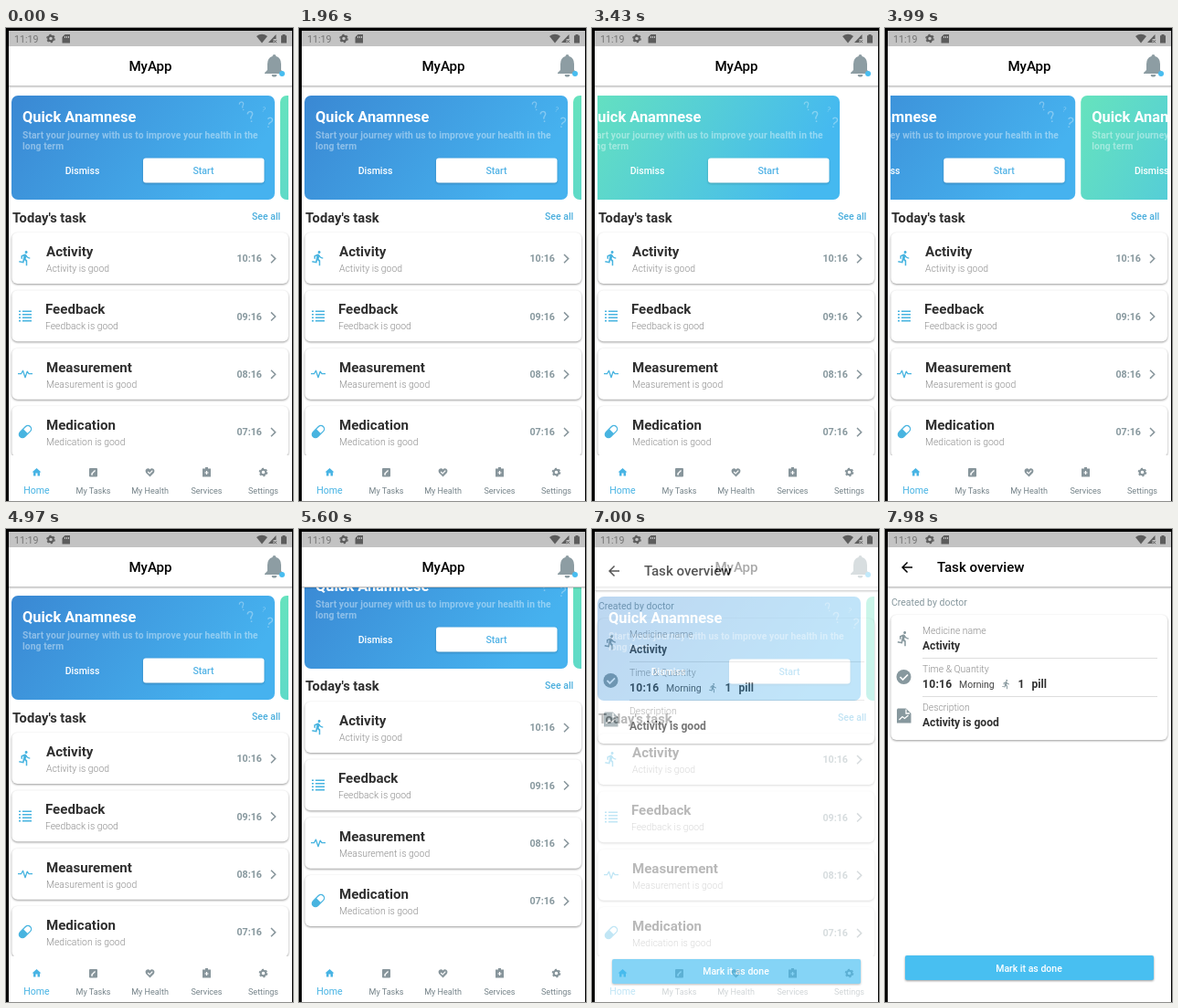
Write an HTML page that moves like this. It is 314 px wide and 518 px high and loops after 8000 ms.

```html
<!DOCTYPE html>
<html lang="en">
<head>
<meta charset="utf-8">
<title>Task app</title>
<style>
html, body { margin: 0; width: 100%; height: 100%; overflow: hidden; background: #fff; }
svg { display: block; width: 314px; height: 518px; font-family: Roboto, sans-serif; }
.b { font-weight: 700; }
.m { font-weight: 500; }
.l { font-weight: 300; }
.mid { text-anchor: middle; }
.h { font-size: 15.08px; }
.s { font-size: 10.5px; }
.v { font-size: 12.06px; font-weight: 700; fill: #303030; }
.hint { font-size: 10.4px; font-weight: 300; fill: #8c8c8c; }
.card { fill: #fff; filter: drop-shadow(0 1px 1px #0006); }

/* The clock in the script sets --t; all keyframes are read at that moment. */
.cards, .list, .page {
  animation: 8s linear infinite paused;
  animation-delay: calc(var(--t, 0) * -1ms);
}
.cards { animation-name: swipe; }
.list { animation-name: scroll; }
.page { animation-name: rise, fade; }
@keyframes swipe {
  0%, 27.125% { transform: none; animation-timing-function: cubic-bezier(.45, 0, .4, 1); }
  36.5% { transform: translateX(-286px); animation-timing-function: ease-out; }
  42.875% { transform: translateX(-317px); animation-timing-function: cubic-bezier(.45, 0, .25, 1); }
  56.875%, 100% { transform: none; }
}
@keyframes scroll {
  0%, 58.625% { transform: none; }
  62.125% { transform: translateY(-1px); animation-timing-function: ease-in-out; }
  69% { transform: translateY(-36px); animation-timing-function: cubic-bezier(.4, 0, .2, 1); }
  78.75% { transform: translateY(-.2px); }
  82.25%, 100% { transform: none; }
}
@keyframes rise {
  0%, 84.575% { transform: translateY(129px); animation-timing-function: cubic-bezier(.4, 0, .2, 1); }
  88.325%, 100% { transform: none; }
}
@keyframes fade {
  0%, 84.575% { opacity: 0; animation-timing-function: ease-in; }
  88.325%, 100% { opacity: 1; }
}
</style>
</head>
<body>
<svg viewBox="0 0 314 518">
  <defs>
    <linearGradient id="blue" x2="1" y2=".3">
      <stop stop-color="#3a88d3"/><stop offset="1" stop-color="#46b2ef"/>
    </linearGradient>
    <linearGradient id="mint" x2="1" y2=".2">
      <stop stop-color="#66e3bd"/><stop offset="1" stop-color="#45b9f0"/>
    </linearGradient>
    <linearGradient id="shade" x2="0" y2="1">
      <stop stop-color="#000" stop-opacity=".27"/><stop offset="1" stop-color="#000" stop-opacity="0"/>
    </linearGradient>
    <clipPath id="strip"><rect x="6" y="66" width="303" height="130"/></clipPath>
    <clipPath id="view"><rect x="3" y="64" width="310" height="404"/></clipPath>

    <!-- icons, centred on 0,0 -->
    <path id="run" transform="translate(-12 -12)" d="M13.49 5.48c1.1 0 2-.9 2-2s-.9-2-2-2-2 .9-2 2 .9 2 2 2zm-3.6 13.9l1-4.4 2.1 2v6h2v-7.5l-2.1-2 .6-3c1.3 1.5 3.3 2.5 5.5 2.5v-2c-1.9 0-3.5-1-4.3-2.4l-1-1.6c-.4-.6-1-1-1.7-1-.3 0-.5.1-.8.1l-5.2 2.2v4.7h2v-3.4l1.8-.7-1.6 8.1-4.9-1-.4 2 7 1.4z"/>
    <g id="gear" fill="none">
      <circle r="2.8" stroke-width="2"/>
      <circle r="4.2" stroke-width="1.3" stroke-dasharray="2.2"/>
    </g>
    <g id="lines" fill="none" stroke-width="1.5">
      <path d="M-3-5.2H7M-3-1.7H7M-3 1.8H7M-3 5.3H7"/>
      <path d="M-7-5.2h2M-7-1.7h2M-7 1.8h2M-7 5.3h2"/>
    </g>
    <path id="pulse" fill="none" stroke-width="1.3" stroke-linejoin="round" d="M-8 0h3.5l2-3.5L0 4 2.2-2.5 4 0h4"/>
    <g id="pill" transform="rotate(-45)">
      <rect x="-8.5" y="-4.3" width="17" height="8.6" rx="4.3"/>
      <path fill="#fff" d="M.6-3H4.2a3 3 0 0 1 0 6H.6z"/>
    </g>
    <g id="runner"><use href="#run" transform="scale(.75)"/></g>
  </defs>

  <rect width="314" height="518" fill="#fff"/>

  <g clip-path="url(#view)">
    <g class="list">
      <g clip-path="url(#strip)"><g class="cards" id="cards"></g></g>
      <text class="b" font-size="14.7" x="7" y="212.5" fill="#2e2e2e">Today's task</text>
      <text class="m s" x="269" y="210" fill="#4aaedd">See all</text>
      <g id="rows"></g>
    </g>
  </g>

  <rect x="3" y="20" width="310" height="43" fill="#fff"/>
  <rect x="3" y="63" width="310" height="3" fill="url(#shade)"/>
  <text class="m h mid" x="158" y="47">MyApp</text>
  <g fill="#8d9da3">
    <path d="M293.5 29a2 2 0 0 1 2 2q5.500 1.500 5.500 8.500v6.500l3 3v1h-21v-1l3-3v-6.500q0-7 5.500-8.500a2 2 0 0 1 2-2zM290.700 51h5.600a2.800 2.600 0 0 1-5.600 0z"/>
    <circle cx="302" cy="50" r="3" fill="#48bdf0"/>
  </g>

  <rect x="3" y="468" width="310" height="50" fill="#fff"/>
  <g fill="#87959b" stroke="none">
    <path transform="translate(27.500 480.500) scale(.5)" fill="#48b4e4" d="M10 20v-6h4v6h5v-8h3L12 3 2 12h3v8z"/>
    <rect x="91" y="482" width="9" height="9.500" rx="1"/>
    <path d="M93.500 488.500l4-4M93.300 489h1.500" stroke="#fff" stroke-width="1.300"/>
    <path d="M157.500 491.500l-4-4q-2-3 .3-4.800 2.200-1.200 3.700.8 1.500-2 3.700-.8 2.300 1.800.3 4.800z"/>
    <path d="M155.200 486l1.900 1.900 3.200-3.200" fill="none" stroke="#fff" stroke-width="1.200"/>
    <path d="M218 481h3v1.500h3v9h-9v-9h3z"/>
    <path d="M217.500 487h4M219.500 485v4" stroke="#fff" stroke-width="1.200"/>
    <use href="#gear" x="281.500" y="486.500" stroke="#87959b"/>
  </g>
  <g id="tabs" class="mid" font-size="9.05" fill="#76848a"></g>

  <g class="page">
    <rect x="3" y="20" width="310" height="500" fill="#fff"/>
    <rect x="3" y="63" width="310" height="3" fill="url(#shade)"/>
    <path transform="translate(15 33) scale(.75)" d="M20 11H7.830l5.590-5.590L12 4l-8 8 8 8 1.410-1.410L7.830 13H20z"/>
    <text class="m h" x="57" y="47">Task overview</text>
    <text class="s" x="7" y="84" fill="#87989e">Created by doctor</text>
    <rect class="card" x="6.500" y="94" width="302.500" height="137" rx="6"/>
    <path d="M41 141.500H298M41 183.500H298" stroke="#ddd"/>
    <g fill="#87989e">
      <use href="#runner" x="20.500" y="120"/>
      <circle cx="20.500" cy="162" r="8"/>
      <path d="M16.500 162l3 3 5.500-5.500" fill="none" stroke="#fff" stroke-width="1.700"/>
      <path d="M14 196.500h9l5.500 5.500v10.500H13V197.500z"/>
      <path d="M15.500 209l3.500-3.500 2.500 2 4-3.500M23 197.500v4.500h4" fill="none" stroke="#fff" stroke-width="1.300"/>
      <use href="#run" transform="translate(132.500 170) scale(.48)"/>
    </g>
    <g class="hint">
      <text x="41" y="115">Medicine name</text>
      <text x="41" y="157">Time &amp; Quantity</text>
      <text x="41" y="199">Description</text>
    </g>
    <g class="v">
      <text x="41" y="132">Activity</text>
      <text x="41" y="174" letter-spacing=".3">10:16</text>
      <text x="145.500" y="174">1</text>
      <text x="160.500" y="174">pill</text>
      <text x="41" y="216">Activity is good</text>
    </g>
    <text class="s" x="81" y="174" fill="#444">Morning</text>
    <rect x="22" y="467" width="272" height="27" rx="2" fill="#48bff1" style="filter:drop-shadow(0 1px 1px #0006)"/>
    <text class="m s mid" x="157.500" y="484.500" fill="#fff">Mark it as done</text>
  </g>

  <rect x="3" y="3" width="310" height="17" fill="#c3c3c3"/>
  <text x="9" y="15.500" font-size="10.700" fill="#747474">11:19</text>
  <g fill="#5c5c5c">
    <use href="#gear" x="49" y="11.500" stroke="#5c5c5c"/>
    <path d="M64.500 7H70v9.500h-8.500V10z"/>
    <path d="M64.500 9v2M66.500 9v2M68.500 9v2" stroke="#c3c3c3"/>
    <path d="M274 9q6-4.500 12 0l-6 7.500z"/>
    <path d="M295.500 7v5h-3v4H287z"/>
    <path d="M293 13.200l3 3m0-3l-3 3" stroke="#5c5c5c"/>
    <path d="M302.500 7h3v1.200h1.500v8.300h-6V8.200h1.500z"/>
  </g>
  <path d="M0 0H314V518H313V3H3V518H0z"/>
</svg>

<script>
const fill = (id, items, draw) =>
  document.getElementById(id).innerHTML = items.map(draw).join('');

const mark = (x, y, size, turn) =>
  `<text class="mid" transform="translate(${x} ${y}) rotate(${turn})" font-size="${size}" fill="#fff" fill-opacity=".33">?</text>`;

fill('cards', ['blue', 'mint'], (paint, i) => `
  <g transform="translate(${i * 294} 0)">
    <rect x="6" y="74" width="288" height="114" rx="7" fill="url(#${paint})"/>
    ${mark(260, 90, 14, -20)}${mark(269, 103, 17, -12)}${mark(287, 109, 16, 14)}${mark(281, 92, 8, 20)}
    <g fill="#fff">
      <text class="b" font-size="16.4" x="18" y="103">Quick Anamnese</text>
      <g class="b" font-size="10.3" letter-spacing=".08" fill-opacity=".42">
        <text x="18" y="120.5">Start your journey with us to improve your health in the</text>
        <text x="18" y="132.5">long term</text>
      </g>
      <text class="m s mid" x="83.5" y="159.5">Dismiss</text>
      <rect x="150" y="142.500" width="132.500" height="27" rx="3" style="filter:drop-shadow(0 1px 1px #0003)"/>
    </g>
    <text class="m s mid" x="216" y="159.500" fill="#55b4e6">Start</text>
  </g>`);

const tasks = [
  ['Activity', '10:16', 'runner', 44],
  ['Feedback', '09:16', 'lines', 43],
  ['Measurement', '08:16', 'pulse', 44],
  ['Medication', '07:16', 'pill', 44]
];
fill('rows', tasks, ([name, time, icon, x], i) => `
  <g transform="translate(0 ${i * 63.35})">
    <rect class="card" x="6.5" y="224" width="302.5" height="56" rx="6"/>
    <use href="#${icon}" x="21" y="252" fill="#48b4e0" stroke="${/lines|pulse/.test(icon) ? '#48b4e0' : 'none'}"/>
    <text class="b h" x="${x}" y="250" fill="#303030">${name}</text>
    <text class="hint" x="${x}" y="267">${name} is good</text>
    <text class="b" font-size="10.7" x="280" y="256.3" text-anchor="end" fill="#87989e">${time}</text>
    <path d="M290 248l4.700 4.600-4.700 4.600" fill="none" stroke="#87959b" stroke-width="1.500"/>
  </g>`);

fill('tabs', ['Home', 'My Tasks', 'My Health', 'Services', 'Settings'], (name, i) =>
  `<text x="${33.5 + i * 62}" y="510"${i ? '' : ' font-size="10.6" fill="#48b4e4"'}>${name}</text>`);

const LOOP = 8000, STEP = 70;
const start = performance.now();
function tick() {
  const t = (performance.now() - start) % LOOP;
  document.documentElement.style.setProperty('--t', Math.floor(t / STEP) * STEP);
  requestAnimationFrame(tick);
}
tick();
</script>
</body>
</html>
```
